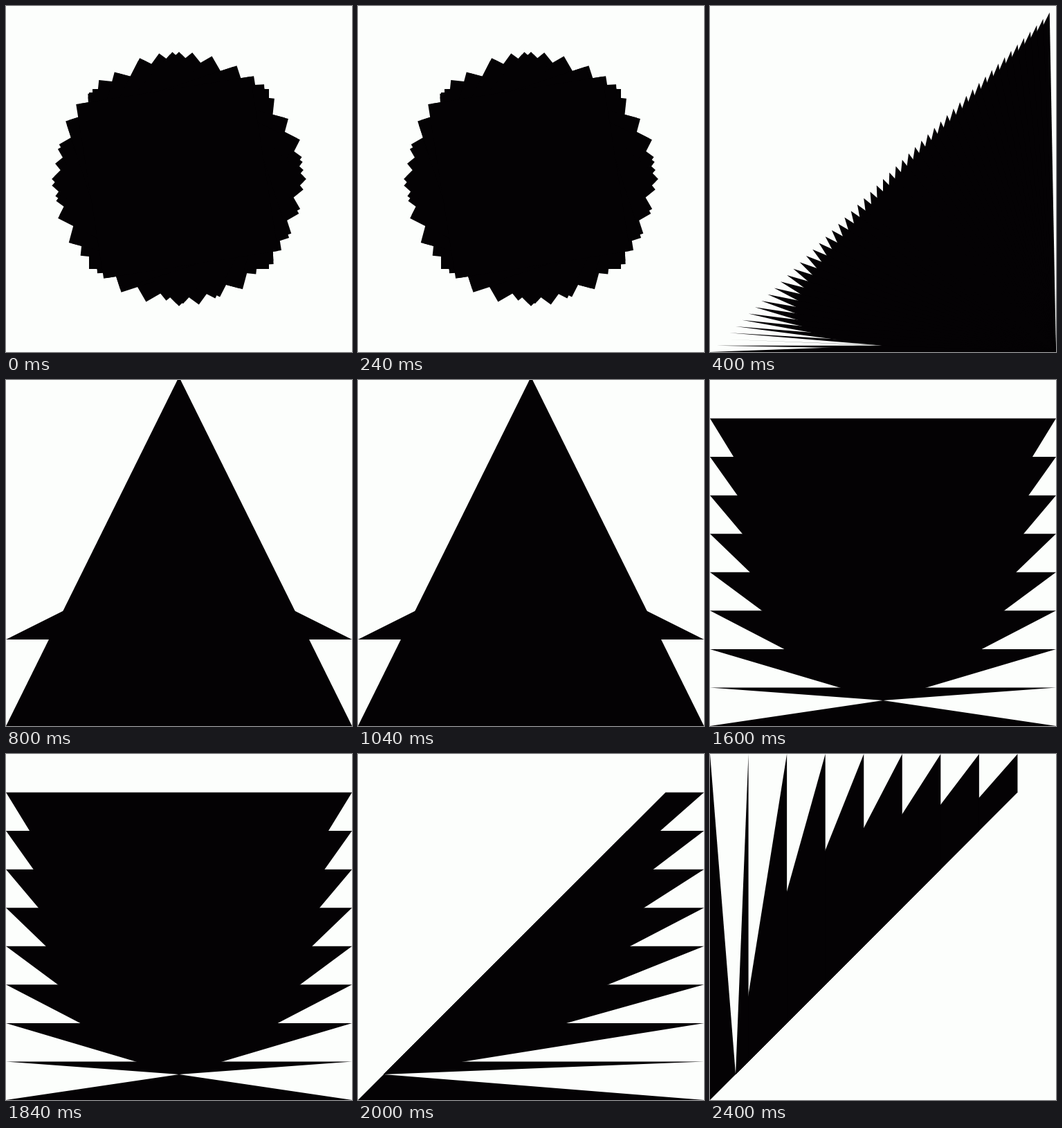
An HTML page for the animation above (2.8 s loop, 500 by 500 pixels).

```html
<!DOCTYPE html>
<html lang="en">
<head>
<meta charset="utf-8">
<title>Rotated and fanned shapes</title>
<style>
  html, body { margin: 0; width: 100%; height: 100%; overflow: hidden; background: #fcfefc; }
  svg { display: block; width: 100vw; height: 100vh; fill: #040204; }
  .pose {
    visibility: hidden;
    animation: show 2800ms step-end infinite;
    animation-delay: calc(var(--slot) * 400ms - 2800ms);
  }
  @keyframes show {
    0% { visibility: visible; }
    14.2857%, 100% { visibility: hidden; }
  }
</style>
</head>
<body>
<svg id="stage" viewBox="0 0 500 500"></svg>
<script>
  const SIZE = 500, MID = SIZE / 2;
  const FINE = SIZE / 54, COARSE = SIZE / 9;

  const triangle = (...points) => `<polygon points="${points.join(' ')}"/>`;

  // One triangle per row; rows are counted from 1 down to the bottom edge.
  const fan = (step, makePoints) => {
    const count = Math.round(SIZE / step);
    return Array.from({ length: count }, (_, i) =>
      triangle(...makePoints((i + 1) * step))).join('');
  };

  const fullRow = (y, apexY) => [[0, y], [SIZE, y], [MID, apexY]];

  // Off-centre squares, turned in multiples of 3 degrees around the middle.
  const turns = [2, 9, 12, 14, 15, 17, 20, 24, 27, 29, 30, 39, 45, 59, 60, 65,
                 72, 75, 80, 84, 90, 95, 99, 104, 105, 114, 117];
  const rosette = turns.map(turn =>
    `<rect x="120" y="120" width="255" height="255"
      transform="rotate(${turn * 3} ${MID} ${MID})"/>`).join('');

  const diagonalTeeth = fan(FINE, y =>
    [[SIZE - y, y], [MID, SIZE - FINE], [SIZE, SIZE]]);

  const tree = triangle(...fullRow(SIZE, -FINE / 2)) + triangle(...fullRow(375, MID));

  const column = fan(FINE, y => fullRow(y, -FINE / 2));

  const hub = COARSE * 2 / 3;
  const bowl = fan(COARSE, y => fullRow(y, SIZE - hub));

  const wing = fan(COARSE, y => [[SIZE - y, y], [SIZE, y], [hub, SIZE - hub]]);
  const flippedWing = `<g transform="matrix(0 -1 -1 0 ${SIZE} ${SIZE})">${wing}</g>`;

  document.getElementById('stage').innerHTML =
    [rosette, diagonalTeeth, tree, column, bowl, wing, flippedWing]
      .map((shape, slot) => `<g class="pose" style="--slot:${slot}">${shape}</g>`)
      .join('');
</script>
</body>
</html>
```
